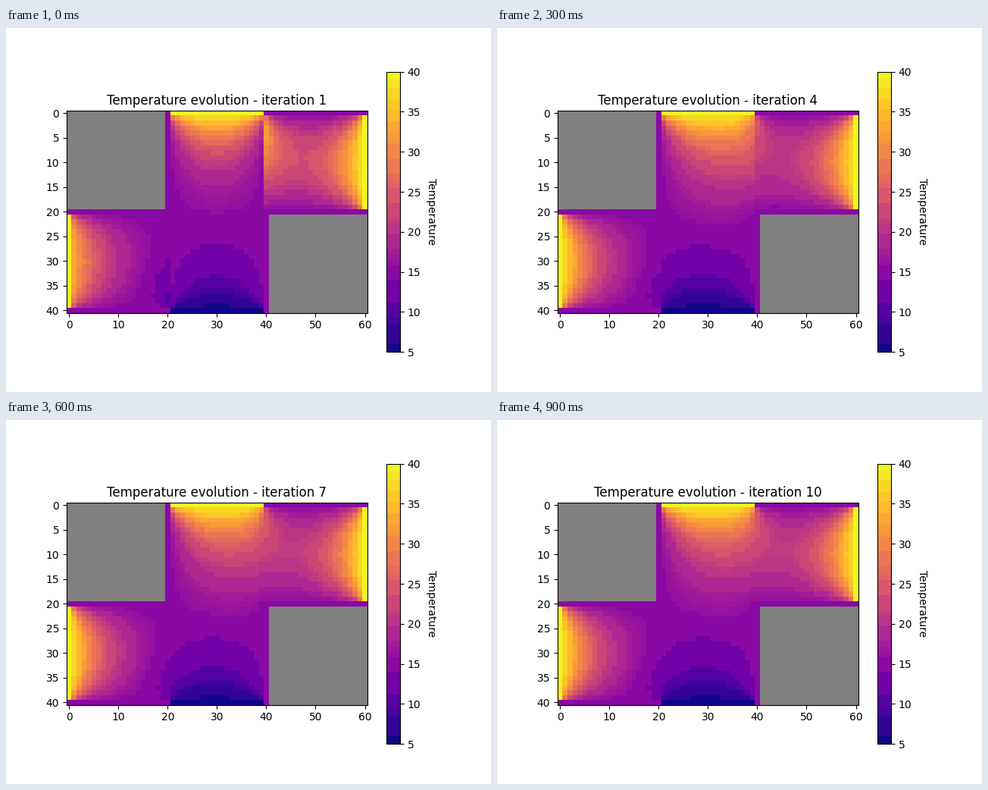
Animation of 640 by 480 pixels, one loop 1 s. Source, as a matplotlib script:

```python
import matplotlib.pyplot as plt
import numpy as np
from matplotlib.animation import FuncAnimation
from matplotlib.colors import ListedColormap

WALL, HEATER, WINDOW = 15.0, 40.0, 5.0
N = 20                # cells per unit length
RELAXATION = 0.8
ITERATIONS = 10


def second_difference(n):
    return np.eye(n, k=1) + np.eye(n, k=-1) - 2 * np.eye(n)


def solve_laplace(shape, top, bottom, left, right, neumann=False):
    """Steady heat in a rectangle; with neumann, `right` is the inflow."""
    rows, cols = shape
    along_x = second_difference(cols)
    if neumann:
        along_x[-1, -1] = -1
    source = np.zeros(shape)
    source[0] += top
    source[-1] += bottom
    source[:, 0] += left
    source[:, -1] += right
    matrix = (np.kron(second_difference(rows), np.eye(cols))
              + np.kron(np.eye(rows), along_x))
    return np.linalg.solve(matrix, -source.ravel()).reshape(shape)


def solve_side_room(inflow):
    return solve_laplace((N - 1, N), WALL, WALL, HEATER, inflow, neumann=True)


def assemble(west, middle, east):
    field = np.full((2 * N + 1, 3 * N + 1), WALL)
    field[:N, :N] = np.nan
    field[N + 1:, 2 * N + 1:] = np.nan
    field[0, N + 1:2 * N] = HEATER
    field[-1, N + 1:2 * N] = WINDOW
    field[N + 1:-1, 0] = HEATER
    field[1:N, -1] = HEATER
    field[1:-1, N + 1:2 * N] = middle
    field[N + 1:-1, 1:N + 1] = west
    field[1:N, 2 * N:-1] = east[:, ::-1]
    return field


def simulate():
    """Dirichlet-Neumann iteration over the three rooms."""
    west = np.full((N - 1, N), WALL)
    east = west.copy()       # mirrored: interface in the last column
    fields = []
    for step in range(ITERATIONS):
        left = np.full(2 * N - 1, WALL)
        right = left.copy()
        left[N:] = west[:, -1]
        right[:N - 1] = east[:, -1]
        middle = solve_laplace((2 * N - 1, N - 1), HEATER, WINDOW, left, right)
        new_west = solve_side_room((middle[:, 0] - left)[N:])
        new_east = solve_side_room((middle[:, -1] - right)[:N - 1])
        east_weight = RELAXATION if step else 1
        west = RELAXATION * new_west + (1 - RELAXATION) * west
        east = east_weight * new_east + (1 - east_weight) * east
        fields.append(assemble(west, middle, east))
    return fields


def banded_plasma(field):
    """Plasma reduced to the mean colour of each coarse RGB cube."""
    colors = plt.get_cmap("plasma")(np.arange(256), bytes=True)[:, :3]
    _, band = np.unique(colors >> np.array([5, 4, 5], np.uint8),
                        axis=0, return_inverse=True)
    band = band.ravel()
    values = field[~np.isnan(field)]
    index = ((values - WINDOW) / (HEATER - WINDOW) * 256).astype(int)
    weight = np.bincount(index.clip(0, 255), minlength=256) + 0.62
    total = np.bincount(band, weight)
    means = [np.bincount(band, weight * channel) / total
             for channel in colors.T]
    cmap = ListedColormap(np.stack(means, axis=1)[band] / 255)
    cmap.set_bad("gray")
    return cmap


fields = simulate()
cmaps = [banded_plasma(field) for field in fields]

fig, ax = plt.subplots(figsize=(6.4, 4.8), dpi=100)
image = ax.imshow(fields[0], cmap=cmaps[0], vmin=WINDOW, vmax=HEATER,
                  interpolation="nearest")
colorbar = fig.colorbar(image, ax=ax)
colorbar.set_label("Temperature", rotation=270, labelpad=15)
title = ax.set_title("")


def update(frame):
    image.set_data(fields[frame])
    image.set_cmap(cmaps[frame])
    title.set_text(f"Temperature evolution - iteration {frame + 1}")
    return image, title


anim = FuncAnimation(fig, update, frames=ITERATIONS, interval=100,
                     repeat=True, repeat_delay=0, blit=False)
plt.show()
```
